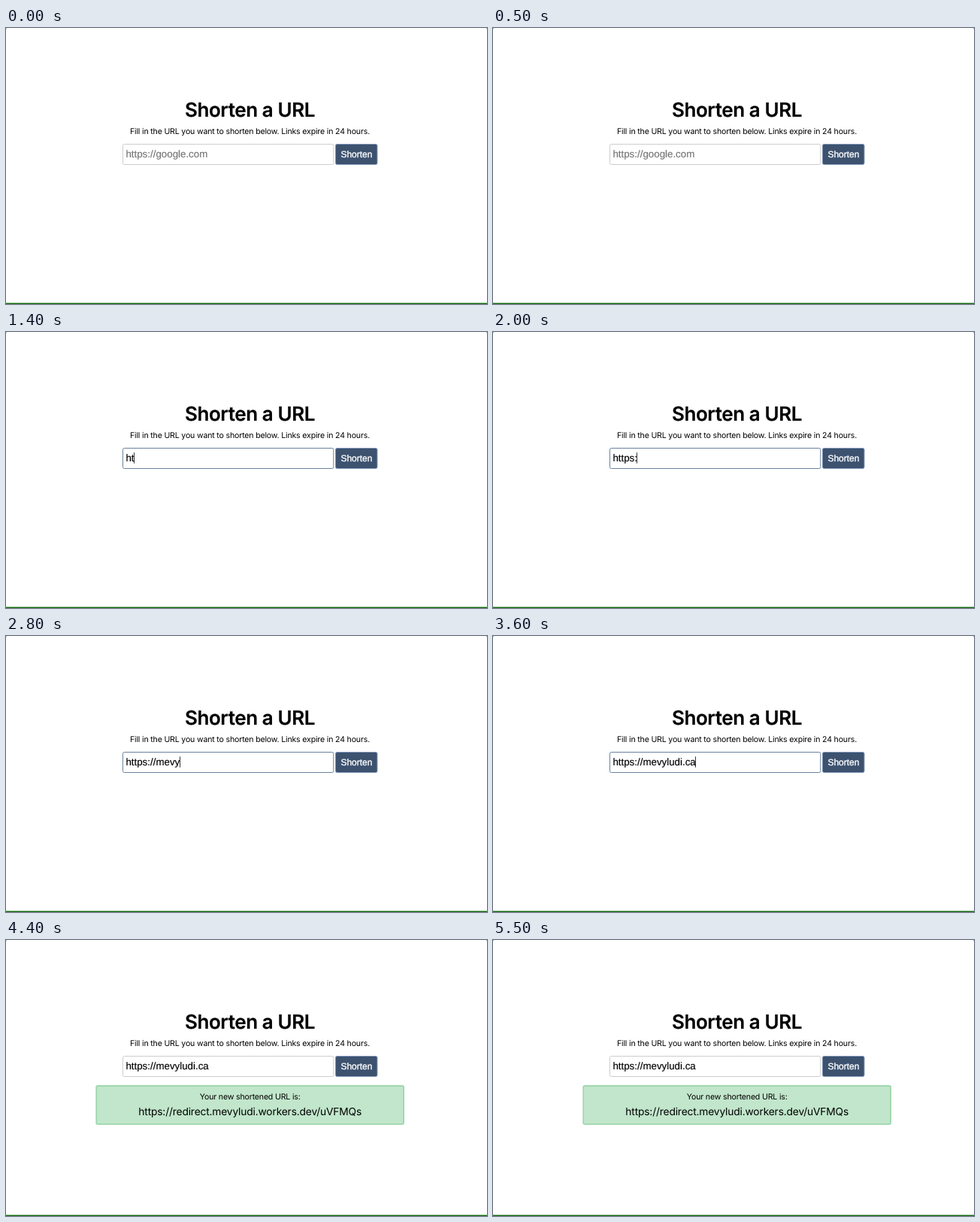
An HTML page for the animation above (5.7 s loop, 640 px wide and 367 px high).

```html
<!DOCTYPE html>
<html lang="en">
<head>
<meta charset="utf-8">
<title>Shorten a URL</title>
<style>
  html, body { margin: 0; width: 100%; height: 100%; overflow: hidden; background: #fff; }
  svg { display: block; width: 640px; height: 367px; }
  text { text-rendering: geometricPrecision; white-space: pre; }
  .page { font-family: Inter, sans-serif; font-optical-sizing: none; letter-spacing: -.011em; text-anchor: middle; }
  .page .title { font-size: 26px; font-weight: 600; letter-spacing: -.016em; stroke: #000; stroke-width: .2; }
  .page .note { font-size: 10.58px; }
  .page .link { font-size: 13.8px; }
  .form { font-family: "Liberation Sans", Arial, sans-serif; font-size: 13.333px; }
  .form text { stroke-width: .15; }
  .form .label { font-size: 12px; fill: #fff; stroke: #fff; stroke-width: .35; text-anchor: middle; }
</style>
</head>
<body>
<svg viewBox="0 0 640 367">
  <path d="M0 0h1v1h-1zM639 0h1v1h-1z" fill="#999"/>
  <rect y="365.6" width="640" height="1.4" fill="#0e670e"/>

  <g class="page">
    <text class="title" x="324.5" y="117.8">Shorten a URL</text>
    <text class="note" x="324.5" y="141">Fill in the URL you want to shorten below. Links expire in 24 hours.</text>
  </g>

  <g class="form">
    <rect id="field" x="155.5" y="154.5" width="280.3" height="27" rx="2" fill="#fff"/>
    <text id="value" x="159.4" y="172.2"></text>
    <rect id="caret" y="160.3" width=".8" height="14.4"/>
    <rect x="438.5" y="154.5" width="55.5" height="27" rx="2" fill="#3c526f" stroke="#8198b8"/>
    <text class="label" x="466.4" y="172">Shorten</text>
  </g>

  <g id="result" class="page">
    <rect x="120.2" y="193.9" width="409" height="51" rx="1.8" fill="#c1e6cb" stroke="#9bd5aa" stroke-width="1.6"/>
    <text class="note" x="324.7" y="212.2">Your new shortened URL is:</text>
    <text class="link" x="324.7" y="233">https://redirect.mevyludi.workers.dev/uVFMQs</text>
  </g>
</svg>
<script>
  const LOOP = 5700;
  const TEXT_X = 159.4;
  const HINT = 'https://google.com';
  const URL_TEXT = 'https://mevyludi.ca';
  // Time at which each character of the URL appears
  const KEYS = [
    1300, 1400, 1500, 1600, 1700, 2000, 2200, 2300,
    2500, 2500, 2700, 2800, 2900, 3000, 3100, 3200,
    3400, 3400, 3600
  ];
  const BORDERS = [[0, '#cdcdcd'], [800, '#9ba8b6'], [900, '#69829f'], [4200, '#9ba8b6'], [4300, '#cdcdcd']];
  const FOCUS = 900, BLUR = 4200, DONE = 4400;

  const $ = id => document.getElementById(id);
  const field = $('field'), value = $('value'), caret = $('caret'), result = $('result');
  const show = (el, on) => el.setAttribute('visibility', on ? 'visible' : 'hidden');

  function render(t) {
    const typed = KEYS.filter(k => t >= k).length;
    const text = typed ? URL_TEXT.slice(0, typed) : HINT;
    const color = typed ? '#000' : '#757575';
    if (value.textContent !== text) value.textContent = text;
    value.setAttribute('fill', color);
    value.setAttribute('stroke', color);

    const border = BORDERS.filter(([at]) => t >= at).pop()[1];
    field.setAttribute('stroke', border);

    const width = typed ? value.getComputedTextLength() : 0;
    caret.setAttribute('x', Math.floor(TEXT_X + width - .2));
    show(caret, t >= FOCUS && t < BLUR);
    show(result, t >= DONE);
  }

  const start = performance.now();
  function tick() {
    render((performance.now() - start) % LOOP);
    requestAnimationFrame(tick);
  }
  tick();
</script>
</body>
</html>
```
